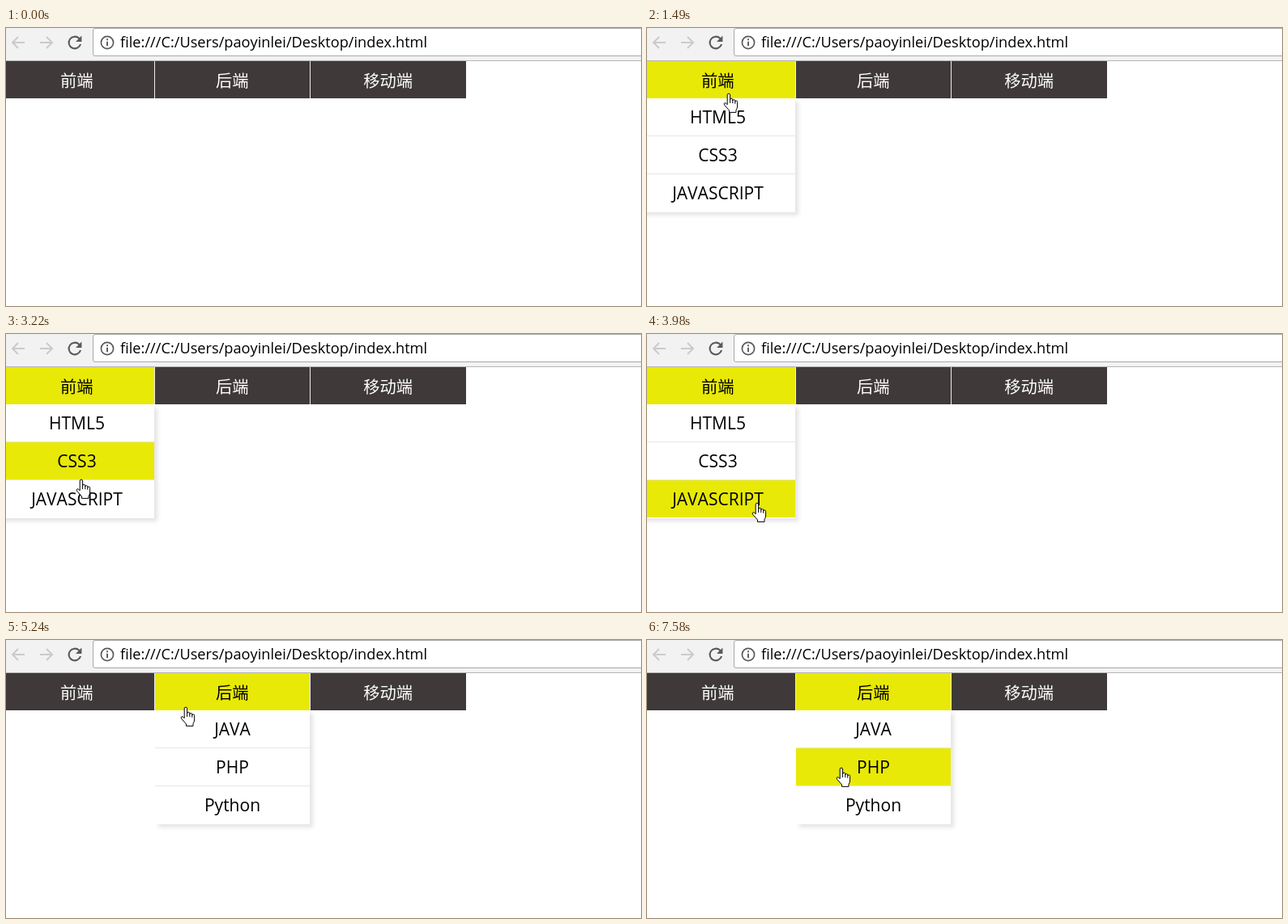
These frames come from a looping animation (784x344 px, 8 s). An HTML page:

```html
<!DOCTYPE html>
<html lang="zh">
<head>
<meta charset="utf-8">
<title>Menu</title>
<style>
  html, body { margin: 0; width: 100%; height: 100%; overflow: hidden; background: #fff; }
  svg { display: block; }
  text { font-family: "Open Sans", "Noto Sans", sans-serif; font-kerning: none; }
  .url { font-size: 18.2px; }
  .head { font-family: "Noto Sans CJK SC", "Noto Sans CJK", sans-serif; font-size: 20.3px; text-anchor: middle; }
  .item { font-size: 21px; text-anchor: middle; }
  .drop { filter: url(#shadow); }
</style>
</head>
<body>
<svg id="stage" width="784" height="344" viewBox="0 0 784 344">
  <defs>
    <filter id="shadow" x="-20%" y="-20%" width="140%" height="140%">
      <feDropShadow dx="4" dy="4" stdDeviation="2.5" flood-color="#000" flood-opacity=".1"/>
    </filter>
  </defs>
  <rect width="784" height="344" fill="#fff"/>
  <g id="menus"></g>
  <rect width="784" height="40" fill="#f2f2f2"/>
  <rect y="40" width="784" height="1" fill="#b6b6b6"/>
  <rect x="107.5" y=".5" width="700" height="34" rx="2.5" fill="#fff" stroke="#a8a8a8"/>
  <path d="M15 11l-7 7 7 7M8 18H23M50 11l7 7-7 7M42 18H57" fill="none" stroke="#cbcbcb" stroke-width="2"/>
  <path transform="translate(72.4 5.4) scale(1.05)" fill="#5a5a5a"
    d="M17.65 6.35A8 8 0 1 0 19.73 14h-2.08A6 6 0 1 1 12 6c1.66 0 3.14.69 4.22 1.78L13 11h7V4z"/>
  <circle cx="125" cy="18" r="7.6" fill="none" stroke="#5a5a5a" stroke-width="1.7"/>
  <path d="M125 13.2v2M125 16.8v5.4" stroke="#5a5a5a" stroke-width="1.9"/>
  <text class="url" x="141" y="24">file:///C:/Users/paoyinlei/Desktop/index.html</text>
  <g id="cursor" fill="#fff" stroke="#000" stroke-linejoin="round">
    <path id="arrow" d="M.5 .5V16.5L4.2 13 6.6 18.6 9 17.6 6.7 12.2H11.8Z"/>
    <g id="hand">
      <path d="M-1.8 13.8V1.9a1.7 1.7 0 0 1 3.4 0V7.8a1.6 1.6 0 0 1 3.2 0V9a1.5 1.5 0 0 1 3 .2V10.2a1.4 1.4 0 0 1 2.8 .3V16q0 2.2-1.6 4.6V23.4H.5V21L-5.4 14.3q-1-2 .3-2.6q1.3-.5 3.3 2.1z"/>
      <path d="M1.6 7.5v4.5M4.8 8.8v3.4M7.8 10v2.8" fill="none"/>
    </g>
  </g>
</svg>
<script>
const LOOP = 8000, TOP = 41, BAR = 87, ROW = 47;
const YELLOW = '#e8e906', DARK = '#3f3939';
const columns = [
  { x: -8, right: 183, name: '前端', items: ['HTML5', 'CSS3', 'JAVASCRIPT'] },
  { x: 184, right: 375, name: '后端', items: ['JAVA', 'PHP', 'Python'] },
  { x: 376, right: 568, name: '移动端', items: [] }
];
// start, end, steps, target x, target y, ease-out power
const moves = [
  [490, 960, 7, 91, 152, 1.6],
  [1110, 1570, 7, 101, 80, 2],
  [2040, 2210, 3, 97, 105, 1.5],
  [2590, 2820, 4, 93, 164, 1.5],
  [3220, 3370, 3, 92, 211, 1],
  [3980, 4300, 5, 206, 205, 2.2],
  [5000, 5400, 6, 224, 70, 2.15],
  [6010, 6250, 4, 229, 105, 1.5],
  [7430, 7580, 3, 240, 158, 1.3]
];

const $ = id => document.getElementById(id);

function add(parent, tag, attrs, text) {
  const el = document.createElementNS('http://www.w3.org/2000/svg', tag);
  for (const key in attrs) el.setAttribute(key, attrs[key]);
  if (text) el.textContent = text;
  return parent.appendChild(el);
}

function show(el, on) {
  el.setAttribute('visibility', on ? 'visible' : 'hidden');
}

for (const c of columns) {
  const mid = (c.x + c.right) / 2, width = c.right - c.x;
  c.drop = add($('menus'), 'g', {});
  if (c.items.length) add(c.drop, 'rect', { class: 'drop', x: c.x, y: BAR, width, height: 3 * ROW, fill: '#fff' });
  c.rows = c.items.map((label, i) => {
    const y = BAR + i * ROW;
    const row = add(c.drop, 'rect', { x: c.x, y, width, height: ROW - 1, fill: '#fff' });
    if (i < 2) add(c.drop, 'rect', { x: c.x, y: y + ROW - 1, width, height: 1, fill: '#e6e6e6' });
    add(c.drop, 'text', { class: 'item', x: mid, y: y + 31 }, label);
    return row;
  });
  c.tab = add($('menus'), 'rect', { x: c.x, y: TOP, width, height: BAR - TOP });
  if (c.right < 568) add($('menus'), 'rect', { x: c.right, y: TOP, width: 1, height: BAR - TOP, fill: '#ececec' });
  c.title = add($('menus'), 'text', { class: 'head', x: mid - 0.3, y: 72.8 }, c.name);
}

// A tab opens its menu; the menu stays open while the pointer is inside it.
function hover(x, y, open) {
  const col = columns.findIndex(c => x >= c.x && x <= c.right);
  const inTab = y >= TOP && y < BAR;
  return inTab || (col === open && y < BAR + 3 * ROW) ? col : -1;
}

const states = [{ t: 0, x: 567, y: 375, open: -1, row: -1 }];
for (const [start, end, steps, tx, ty, power] of moves) {
  const from = states[states.length - 1];
  for (let i = 1; i <= steps; i++) {
    const k = 1 - (1 - i / steps) ** power;
    const x = Math.round(from.x + (tx - from.x) * k);
    const y = Math.round(from.y + (ty - from.y) * k);
    const t = Math.floor((start + (end - start) * (i - 1) / (steps - 1)) / 10) * 10;
    const open = hover(x, y, states[states.length - 1].open);
    states.push({ t, x, y, open, row: open < 0 ? -1 : Math.floor((y - BAR) / ROW) });
  }
}

function draw(time) {
  const s = states.filter(state => state.t <= time).pop();
  columns.forEach((c, i) => {
    const on = i === s.open;
    show(c.drop, on);
    c.tab.setAttribute('fill', on ? YELLOW : DARK);
    c.title.setAttribute('fill', on ? '#000' : '#fff');
    c.rows.forEach((row, j) => row.setAttribute('fill', on && j === s.row ? YELLOW : '#fff'));
  });
  $('cursor').setAttribute('transform', `translate(${s.x} ${s.y})`);
  show($('hand'), s.open >= 0);
  show($('arrow'), s.open < 0);
}

const begin = performance.now();
function tick() {
  draw((performance.now() - begin) % LOOP);
  requestAnimationFrame(tick);
}
tick();
</script>
</body>
</html>
```
